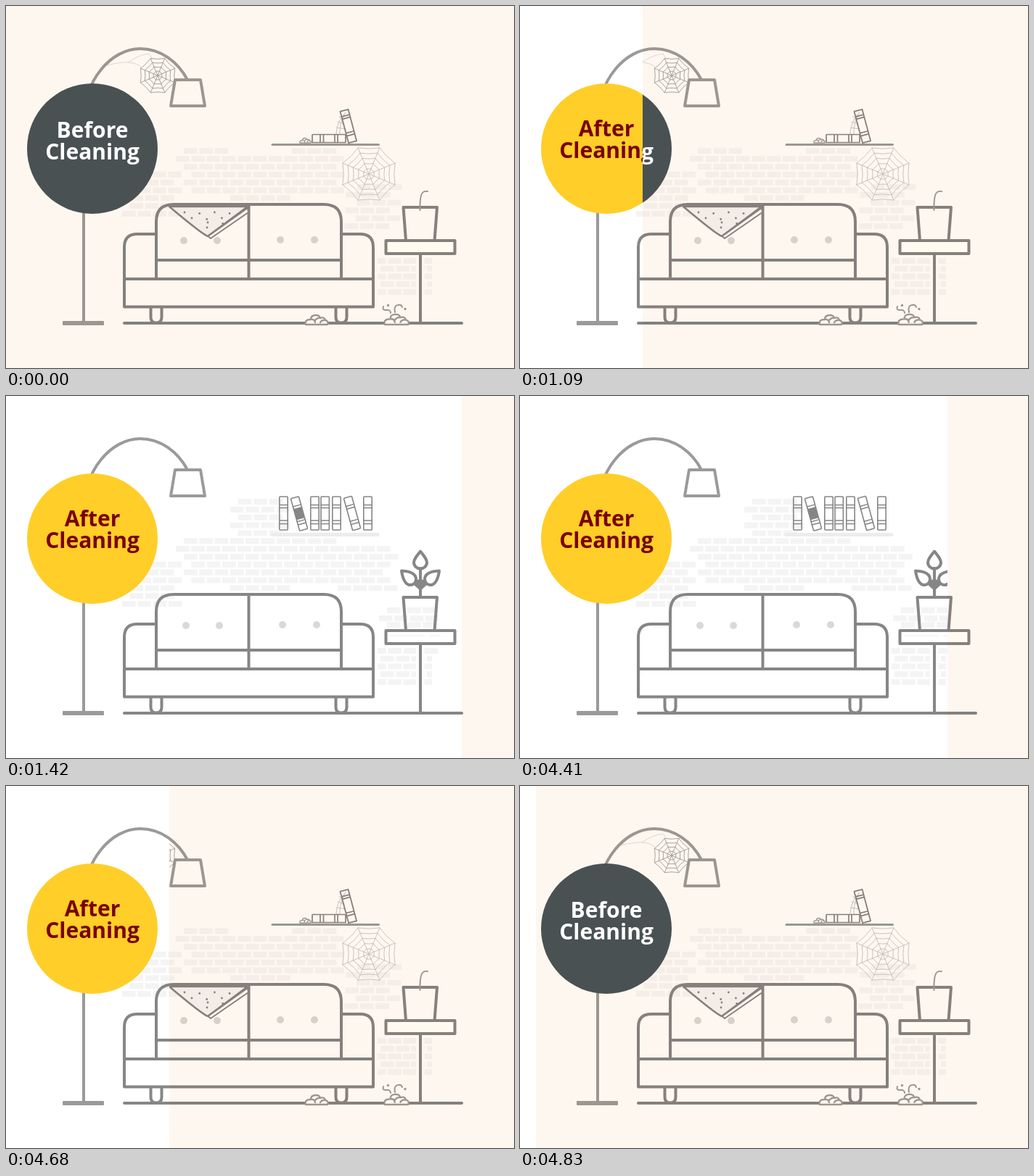
Recreate the animation shown at these times as an HTML page with a canvas. Size 700x500 px, loop 6190 ms.

```html
<!DOCTYPE html>
<html lang="en">
<head>
<meta charset="utf-8">
<title>Before and after cleaning</title>
<style>
html, body { margin: 0; width: 100%; height: 100%; overflow: hidden; }
canvas { display: block; width: 700px; height: 500px; }
</style>
</head>
<body>
<canvas id="stage" width="700" height="500"></canvas>
<script>
const W = 700, H = 500, LOOP = 6190, STEP = 30, LAST = 14;
const ctx = document.getElementById('stage').getContext('2d');

const CLEAN = { wall: '#ffffff', line: '#868686', lamp: '#9a9a9a', brick: '#f4f4f4', button: '#d9d9d9' };
const DIRTY = { wall: '#fef7f0', line: '#86807c', lamp: '#9c9690', brick: '#f5ede7', button: '#d7d1cc' };

function stroke(d, color, width = 4, fill) {
  const path = new Path2D(d);
  if (fill) { ctx.fillStyle = fill; ctx.fill(path); }
  ctx.strokeStyle = color;
  ctx.lineWidth = width;
  ctx.stroke(path);
}

function dot(x, y, r, color) {
  ctx.fillStyle = color;
  ctx.beginPath();
  ctx.arc(x, y, r, 0, Math.PI * 2);
  ctx.fill();
}

function placed(x, y, angle, draw) {
  ctx.save();
  ctx.translate(x, y);
  ctx.rotate(angle);
  draw();
  ctx.restore();
}

// Bricks

const BRICK_W = 18.6, BRICK_H = 8, PITCH_X = 21.3, PITCH_Y = 10.85;

function bricks(y, x, count) {
  for (let i = 0; i < count; i++) ctx.fillRect(x + i * PITCH_X, y, BRICK_W, BRICK_H);
}

function courses(list) {
  for (const [row, x, count] of list) bricks(142 + row * PITCH_Y, x, count);
}

function wallCommon(p) {
  ctx.fillStyle = p.brick;
  courses([[8, 202, 2], [9, 191.5, 2], [10, 181, 3], [11, 170.5, 3],
    [12, 170.5, 3], [13, 160, 4], [11, 309, 4]]);
  ctx.save();
  ctx.beginPath();
  ctx.rect(512, 345, 53, 60);
  ctx.rect(576.5, 345, 10.5, 60);
  ctx.clip();
  for (let i = 0; i < 5; i++) bricks(348 + i * 10.75, i % 2 ? 516 : 505, 4);
  ctx.restore();
}

function wallClean() {
  courses([[0, 320, 3], [1, 309, 4], [2, 320, 3], [3, 309, 4], [4, 320, 3],
    [5, 245, 10], [6, 234, 14], [7, 245, 14], [8, 255.5, 13], [9, 245, 13],
    [10, 255.5, 13], [11, 457, 4]]);
  bricks(292, 525, 1);
  bricks(292, 553, 2);
  bricks(303, 514, 4);
  bricks(312, 525, 1);
  bricks(312, 553, 2);
  bricks(348, 577, 1);
}

function wallDirty() {
  courses([[5, 245, 3], [5, 394, 3], [6, 234, 11], [7, 245, 10],
    [8, 255.5, 10], [9, 245, 10], [10, 255.5, 10]]);
  for (let i = 0; i < 6; i++) bricks(246 + i * 10.8, (i % 2 ? 469 : 484) - i * 0.5, 3);
}

// Furniture

function lamp(p) {
  ctx.fillStyle = p.lamp;
  ctx.beginPath();
  ctx.roundRect(78, 435, 57, 6, 1);
  ctx.fill();
  stroke('M107 437V160C107 102 145 59 185 59C213 59 237 77 250 102', p.lamp);
  stroke('M233 102H268L274 138H227Z', p.lamp);
}

function sofa(p, buttons) {
  for (const [x, y] of buttons) dot(x, y, 5, p.button);
  stroke('M207 377V298Q207 274 231 274H438Q462 274 462 298V377', p.line);
  stroke('M207 351H462M334.5 274V377', p.line);
  stroke('M207 315H181Q163 315 163 333V415.5H506V333Q506 315 488 315H462M163 377H506', p.line);
  for (const x of [199.5, 454.5])
    stroke(`M${x} 416V430Q${x} 437.500 ${x + 7.5} 437.500T${x + 15} 430V416`, p.line);
  stroke('M163 438H628', p.line);
}

function table(p, top) {
  stroke('M571 342V437', p.line);
  stroke('M523.5 324H618.500V342H523.5Z', p.line, 4, top);
  stroke('M547.5 278H594L590.500 324H551Z', p.line);
}

function badge(fill, ink, word, base) {
  dot(119, 197, 90, fill);
  ctx.fillStyle = ink;
  ctx.font = '700 30px "Open Sans", sans-serif';
  ctx.textAlign = 'center';
  ctx.fillText(word, 119, base);
  ctx.fillText('Cleaning', 119, base + 30);
}

// Clean room

function book(x, y, angle, label) {
  placed(x, y, angle, () => {
    stroke('M-5.7 -22Q-5.7 -23 -4.7 -23H4.700Q5.7 -23 5.7 -22V22Q5.700 23 4.700 23H-4.700Q-5.7 23 -5.7 22Z', CLEAN.line, 1.6);
    stroke('M-5.7 -11.500H5.700M-5.7 -7.500H5.700M-5.700 10H5.7M-5.7 14.500H5.700', CLEAN.line, 1.5);
    if (label) {
      ctx.fillStyle = CLEAN.line;
      ctx.fillRect(-5.7, -7.5, 11.4, 15);
    }
  });
}

function plant(p) {
  stroke('M571 238V278', p.line);
  stroke('M571 214.500C565 222 562 226 562 230A9 8.500 0 0 0 580 230C580 226 577 222 571 214.500Z', p.line);
  for (const side of [-1, 1]) {
    ctx.save();
    ctx.translate(571, 0);
    ctx.scale(side, 1);
    stroke('M26 241.500C15 242 7 245 6 252Q6 258 10 260C18 264 24 256 26 241.500Z', p.line);
    ctx.restore();
  }
  ctx.fillStyle = p.line;
  ctx.fill(new Path2D('M571 269L561 260Q564 252 571 254Q578 252 581 260Z'));
}

function cleanRoom() {
  const p = CLEAN;
  ctx.fillStyle = p.wall;
  ctx.fillRect(0, 0, W, H);
  wallCommon(p);
  wallClean();
  stroke('M367 191.500H512', '#ececec', 5);
  for (const x of [382.5, 425.5, 439.7, 455.5, 498.5]) book(x, 162, 0);
  book(404, 162.5, -0.27, true);
  book(477, 162, -0.27);
  plant(p);
  table(p, '#ffffff');
  ctx.fillStyle = p.brick;
  ctx.fillRect(529, 330, 48, 2);
  ctx.fillRect(583, 330, 15, 2);
  sofa(p, [[248, 317], [294, 317], [381, 316], [428, 316]]);
  lamp(p);
  badge('#ffce28', '#7a0000', 'After', 180);
}

// Dirty room

function web(cx, cy, radius, rings, color, width) {
  const at = (i, r) => {
    const a = (i + 0.5) * Math.PI / 4;
    return [cx + r * Math.cos(a), cy + r * Math.sin(a)];
  };
  ctx.strokeStyle = color;
  ctx.lineWidth = width;
  ctx.beginPath();
  for (let i = 0; i < 8; i++) {
    ctx.moveTo(cx, cy);
    ctx.lineTo(...at(i, radius));
    for (let k = 1; k <= rings; k++) {
      const r = radius * k / rings;
      ctx.moveTo(...at(i, r));
      ctx.quadraticCurveTo(...at(i + 0.5, r * 0.86), ...at(i + 1, r));
    }
  }
  ctx.stroke();
}

function dust(x, y, scale, p, width) {
  placed(x, y, 0, () => {
    ctx.scale(scale, scale);
    stroke('M-15 0Q-17 -7 -8 -7Q-8 -13 -1 -13Q4 -13 5 -9Q11 -11 12 -6Q17 -5 15 0ZM-8 -7Q-3 -8 -2 -3M-2 -6Q1 -10 5 -9M5 -3Q7 -7 12 -6',
      p.lamp, width / scale, p.wall);
  });
}

function blanket(p) {
  stroke('M225 277H333L278 318Q270 315 225 277Z', p.line, 2.5, '#f4ece7');
  stroke('M333 279L278.500 318L282 321L334 285Z', p.line, 2, p.wall);
  const rows = [[285, 246, 4], [293, 256, 3], [299, 278, 2], [306, 277, 1]];
  for (const [y, x, count] of rows)
    for (let i = 0; i < count; i++) dot(x + i * 20.7, y + (i % 2 ? 1.5 : 0), 1.4, p.line);
}

function dirtyBooks(p) {
  stroke('M468 147Q455 160 455 177M467 148Q459 163 460 177M465 155L459 153M466 163L457 160M468 170L456 168', '#c6c0bb', 1);
  stroke('M423 177.500H467Q468 177.500 468 178.500V188.500H422V178.500Q422 177.500 423 177.500ZM433 178V188M437.500 178V188M453 178V188M457 178V188', p.line, 1.7);
  placed(471.8, 166, -0.26, () => {
    stroke('M-5.7 -22.500H5.700V22.500H-5.700ZM-5.7 -15H5.7M-5.700 -11.500H5.7M-5.7 8.500H5.700M-5.7 12.500H5.700', p.line, 1.8);
  });
  stroke('M367 191.500H513.500', p.lamp, 3);
  dust(412.5, 189, 0.5, p, 1.4);
}

function dirtyRoom() {
  const p = DIRTY;
  ctx.fillStyle = p.wall;
  ctx.fillRect(0, 0, W, H);
  wallCommon(p);
  wallDirty();
  web(500, 232, 39, 5, '#c9c4bf', 1);
  dirtyBooks(p);
  table(p, '#fffbf0');
  stroke('M570.500 282Q570 260 575 257Q577 255.500 581 256', p.lamp, 2);
  sofa(p, [[245, 324], [291, 324], [378, 323], [425, 323]]);
  blanket(p);
  dust(428, 440, 1, p, 2.3);
  dust(538, 440, 1.08, p, 2.3);
  stroke('M520 415Q518 420 523 420Q530 419 530 424M536 423Q534 414 540 413Q545 412 546 416', p.lamp, 2);
  dot(526.5, 413.5, 1.7, p.lamp);
  dot(550, 418.5, 1.7, p.lamp);
  stroke('M139 82Q158 77 170 78Q180 79 186 84M168 78Q181 68 197 66L202 73', '#dcd6d0', 1);
  web(209, 96, 25.5, 4, '#aaa49f', 1);
  lamp(p);
  badge('#4a5153', '#ffffff', 'Before', 182);
}

// The divider moves in even steps; the clean room lies to its left.
function dividerAt(t) {
  if (t < 1000) return 0;
  if (t < 4410) return 44 + 41.72 * Math.min(LAST, Math.floor((t - 1000) / STEP));
  return 589 - 40.5 * Math.min(LAST, Math.floor((t - 4410) / STEP));
}

function clipped(x, width, draw) {
  ctx.save();
  ctx.beginPath();
  ctx.rect(x, 0, width, H);
  ctx.clip();
  draw();
  ctx.restore();
}

ctx.lineCap = 'round';
ctx.lineJoin = 'round';
const start = performance.now();

function frame() {
  const x = Math.round(dividerAt((performance.now() - start) % LOOP));
  clipped(x, W - x, dirtyRoom);
  if (x > 0) clipped(0, x, cleanRoom);
  requestAnimationFrame(frame);
}
frame();
</script>
</body>
</html>
```
